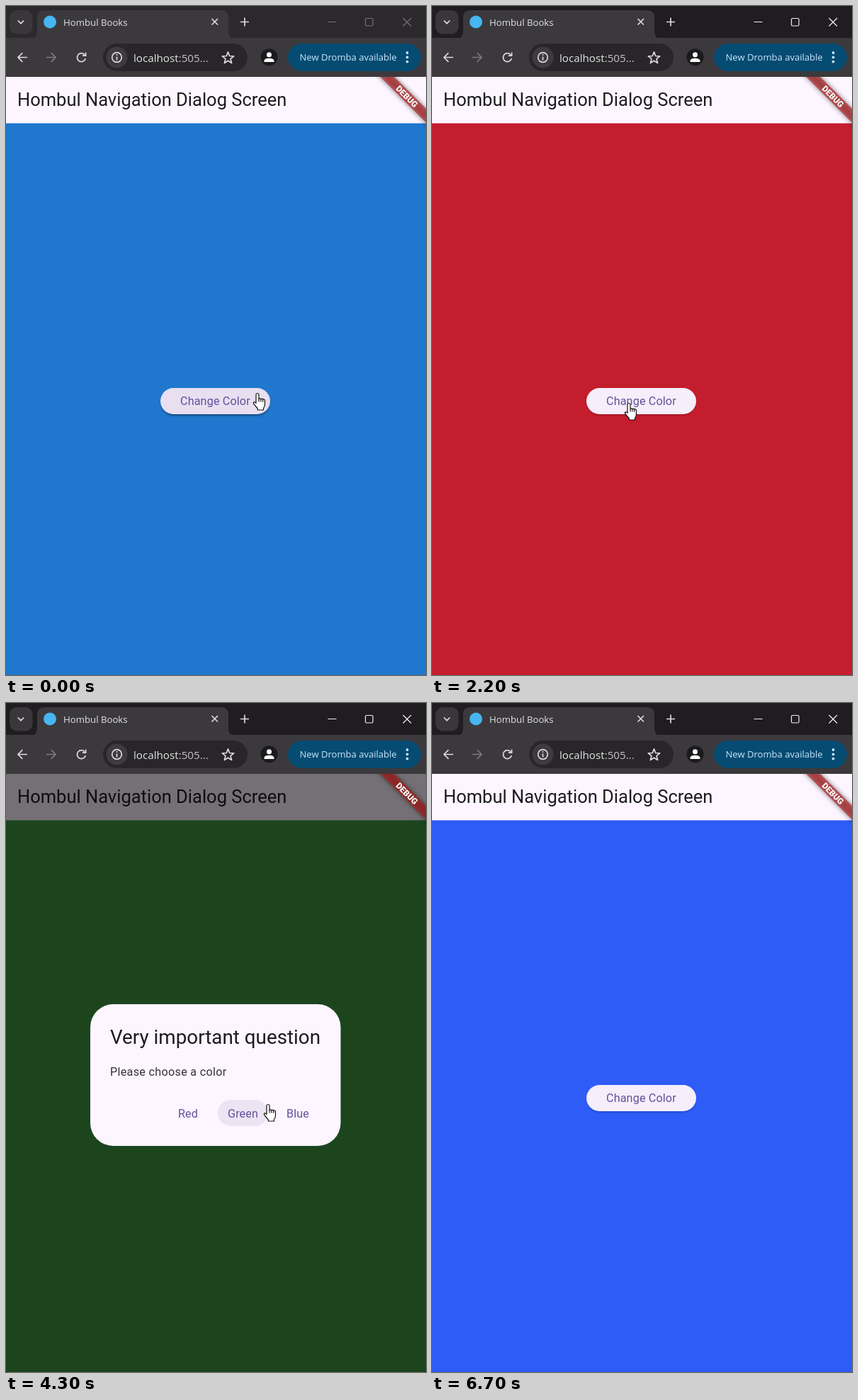
Write an HTML page that moves like this. It is 593 px wide and 944 px high and loops after 6800 ms.

```html
<!DOCTYPE html>
<html lang="en">
<head>
<meta charset="utf-8">
<title>Dialog demo</title>
<style>
  html, body { margin: 0; width: 100%; height: 100%; overflow: hidden; }
  svg { display: block; width: 100%; height: 100%; }
  .ui { font-family: "Open Sans", "Noto Sans", sans-serif; fill: #e3e3e3; }
  .app { font-family: Roboto, sans-serif; fill: #1d1b20; }
  .label { font-size: 16.2px; letter-spacing: .12px; fill: #62529a; }
  .line { fill: none; stroke: #dcdadd; stroke-width: 1.7; }
</style>
</head>
<body>
<svg viewBox="0 0 593 944" preserveAspectRatio="none">
  <defs>
    <filter id="soft" x="-20%" y="-150%" width="140%" height="400%"><feGaussianBlur stdDeviation="3.6"/></filter>
    <filter id="lift" x="-10%" y="-30%" width="120%" height="170%"><feGaussianBlur stdDeviation="1.6"/></filter>
    <clipPath id="page"><rect y="100" width="593" height="844"/></clipPath>
  </defs>

  <!-- page -->
  <rect id="body" y="165" width="593" height="779"/>
  <rect y="100" width="593" height="65.5" fill="#fdf5ff"/>
  <text class="app" x="16" y="141.3" font-size="25.5">Hombul Navigation Dialog Screen</text>
  <rect id="shadow" x="219" y="541.5" width="153" height="36.5" rx="18" filter="url(#lift)"/>
  <rect id="button" x="218" y="539" width="155" height="37" rx="18.5"/>
  <circle class="ripple" r="10.5" fill="#65558f" opacity=".1"/>
  <text class="app label" x="246" y="563.3">Change Color</text>

  <g id="modal">
    <rect y="100" width="593" height="844" opacity=".54"/>
    <rect x="119" y="425" width="353.5" height="200" rx="32.5" fill="#fdf5ff"/>
    <text class="app" x="147" y="481" font-size="27.8">Very important question</text>
    <text class="app" x="147" y="526" font-size="16.2" letter-spacing=".29" style="fill:#36323a">Please choose a color</text>
    <g id="pills"></g>
    <circle class="ripple" r="10.5" fill="#65558f" opacity=".1"/>
    <g class="app label">
      <text x="243" y="584.7">Red</text>
      <text x="313" y="584.7">Green</text>
      <text x="396" y="584.7">Blue</text>
    </g>
  </g>

  <g clip-path="url(#page)">
    <g transform="translate(566 127.7) rotate(45)">
      <rect x="-70" y="-7" width="140" height="14" opacity=".5" filter="url(#soft)"/>
      <rect x="-70" y="-7" width="140" height="14" fill="#b71c1c" opacity=".627"/>
      <text class="app" y="4.2" text-anchor="middle" font-size="11.8" font-weight="900" style="fill:#fff">DEBUG</text>
    </g>
  </g>

  <!-- browser frame -->
  <rect id="titlebar" width="593" height="46"/>
  <rect y="45" width="593" height="55" fill="#3b393c"/>
  <path d="M34 46Q44 46 44 36V16Q44 6 54 6H304Q314 6 314 16V36Q314 46 324 46Z" fill="#3b393c"/>
  <rect x="5" y="6" width="32.5" height="33.5" rx="10" fill="#39373a"/>
  <path class="line" d="M16.800 20.500l4.200 4.200 4.200-4.200" stroke-width="2"/>
  <circle cx="62" cy="22.500" r="9" fill="#47b5f0"/>
  <text class="ui" x="81" y="28" font-size="13.200">Hombul Books</text>
  <path class="line" d="M290.500 18l8.500 8.500m0-8.500l-8.500 8.500M331 22.500h12m-6-6v12"/>
  <path id="controls" class="line" style="stroke-width:1.200" d="M454.500 22.500h12M509 17.500h7.500q1.500 0 1.500 1.500v7.500q0 1.500-1.500 1.500h-7.500q-1.500 0-1.500-1.500v-7.500q0-1.500 1.500-1.500zM560.500 17l11.500 11.500m0-11.500l-11.500 11.500"/>
  <path class="line" d="M30 72.500H17m6.300-6.300l-6.300 6.300 6.300 6.300"/>
  <path class="line" d="M57 72.500H70m-6.300-6.300l6.300 6.300-6.300 6.300" style="stroke:#7c7a7d"/>
  <path class="line" d="M111.300 69A6 6 0 1 0 112.300 74M112.600 65.500v4.700h-4.700"/>
  <rect x="137" y="53" width="204" height="39" rx="19.500" fill="#282629"/>
  <circle cx="156.500" cy="72.500" r="15" fill="#3d3b3e"/>
  <circle class="line" cx="156.500" cy="72.500" r="6.800"/>
  <path class="line" d="M156.500 71.500v5m0-8.500v1.800"/>
  <text class="ui" x="180" y="79" font-size="15.200">localhost<tspan fill="#c5c3c6">:505...</tspan></text>
  <path id="star" class="line" stroke-linejoin="round"/>
  <circle cx="371.500" cy="72.300" r="12" fill="#1b1a1c"/>
  <path d="M371.500 65.300a3.500 3.500 0 0 1 0 7a3.500 3.500 0 0 1 0-7zM364.500 79v-1.500q0-3.800 7-3.800t7 3.800v1.500z" fill="#fff"/>
  <rect x="398" y="53" width="188" height="39" rx="19.500" fill="#064b72"/>
  <text class="ui" x="414.500" y="77" font-size="13.050" style="fill:#c8e8fb">New Dromba available</text>
  <g fill="#c8e8fb">
    <circle cx="566.500" cy="66" r="1.900"/><circle cx="566.500" cy="72.300" r="1.900"/><circle cx="566.500" cy="78.600" r="1.900"/>
  </g>

  <path id="cursor" fill="#fff" stroke="#111" stroke-width="1.200" stroke-linejoin="round"/>
</svg>
<script>
const $ = id => document.getElementById(id);
const LOOP = 6800, STEP = 100, FADE = 150;
const HAND = 'M-2 1.500a2 2 0 0 1 4 0V7.500q1.500-1.200 2.900.1q1.600-.9 2.800.4q2-.5 2.800 1.300V15q0 3-2 5.500V23H.3V21L-5.200 14.500q-1-1.900.5-2.600q1.300-.4 2.700 1.600ZM2 7.500v4M4.900 7.800v3.700M7.700 8.300v3.400';
const ARROW = 'M0 0V16.200L3.700 12.900 6.200 18.500 8.700 17.400 6.300 12H11Z';

// Each dialog: opening time, choosing time, chosen color.
const dialogs = [
  { open: 760, close: 1990, color: '#c41d2d' },
  { open: 2790, close: 3560, color: '#3d9841' },
  { open: 4040, close: 4860, color: '#2d5cf7' }
];
const START_COLOR = '#1f78cd';
const FOCUS_TIME = 600;

// time, x, y of the pointer tip
const path = [
  [0, 355, 547], [900, 355, 547], [1600, 265, 572], [1800, 259, 571], [2000, 259, 571],
  [2200, 278, 561], [2500, 300, 553], [2900, 300, 555], [3300, 339, 580], [3600, 339, 580],
  [3850, 332, 557], [4100, 335, 557], [4300, 370, 567], [4600, 408, 572], [4900, 408, 572],
  [5200, 402, 572], [5500, 440, 552], [6000, 606, 500]
];
const mainButton = { x: 218, y: 539, w: 155 };
const pills = [[225, 65], [299, 71], [379.5, 65]].map(([x, w]) => {
  const node = document.createElementNS('http://www.w3.org/2000/svg', 'rect');
  const attrs = { x, y: 560, width: w, height: 37, rx: 18.5, fill: '#ece4f3' };
  for (const key in attrs) node.setAttribute(key, attrs[key]);
  $('pills').append(node);
  return { x, y: 560, w, node };
});
const ripples = document.querySelectorAll('.ripple');

$('star').setAttribute('d', 'M' + Array.from({ length: 10 }, (_, i) => {
  const r = i % 2 ? 3.7 : 8.6, a = i * Math.PI / 5;
  return (313.5 + r * Math.sin(a)).toFixed(1) + ' ' + (73.5 - r * Math.cos(a)).toFixed(1);
}).join('L') + 'Z');

const clamp = v => Math.max(0, Math.min(1, v));
const easeOut = v => 1 - (1 - clamp(v)) ** 2;

function pointer(t) {
  const next = path.findIndex(p => p[0] > t);
  if (next < 1) return (next ? path[path.length - 1] : path[0]).slice(1);
  const a = path[next - 1], b = path[next];
  const k = (t - a[0]) / (b[0] - a[0]), s = k * k * (3 - 2 * k);
  return [a[1] + (b[1] - a[1]) * s, a[2] + (b[2] - a[2]) * s];
}

function hit(t) {
  const [x, y] = pointer(t);
  const open = dialogs.some(d => t >= d.open && t < d.close + FADE);
  return (open ? pills : [mainButton]).find(r =>
    x >= r.x && x <= r.x + r.w && y >= r.y && y <= r.y + 37);
}

function showRipple(node, on, x, y) {
  node.setAttribute('visibility', on ? 'visible' : 'hidden');
  node.setAttribute('cx', x);
  node.setAttribute('cy', y);
}

function draw(t) {
  const [x, y] = pointer(t);
  const hovered = hit(t - 100);
  const pressed = key => dialogs.some(d => t >= d[key] - 100 && t < d[key]);

  let color = START_COLOR, alpha = 0;
  for (const d of dialogs) {
    if (t >= d.close) color = d.color;
    if (t >= d.open && t < d.close) alpha = easeOut((t - d.open) / FADE);
    else if (t >= d.close && t < d.close + FADE) alpha = 1 - clamp((t - d.close) / FADE);
  }
  $('body').setAttribute('fill', color);
  $('modal').setAttribute('opacity', alpha);
  $('button').setAttribute('fill', hovered === mainButton ? '#e9dff1' : '#f6eefa');
  $('shadow').setAttribute('opacity', hovered === mainButton ? .4 : .15);
  for (const p of pills) p.node.setAttribute('opacity', hovered === p ? 1 : 0);
  showRipple(ripples[0], pressed('open'), x, y + 6);
  showRipple(ripples[1], pressed('close'), x, y);

  const focused = t >= FOCUS_TIME;
  $('titlebar').setAttribute('fill', focused ? '#1f1d20' : '#2b292c');
  $('controls').style.stroke = focused ? '#f0eff0' : '#757376';

  $('cursor').setAttribute('d', hit(t) ? HAND : ARROW);
  $('cursor').setAttribute('transform', `translate(${x} ${y})`);
}

const start = performance.now();
function tick() {
  const t = (performance.now() - start) % LOOP;
  draw(Math.floor(t / STEP) * STEP);
  requestAnimationFrame(tick);
}
tick();
</script>
</body>
</html>
```
